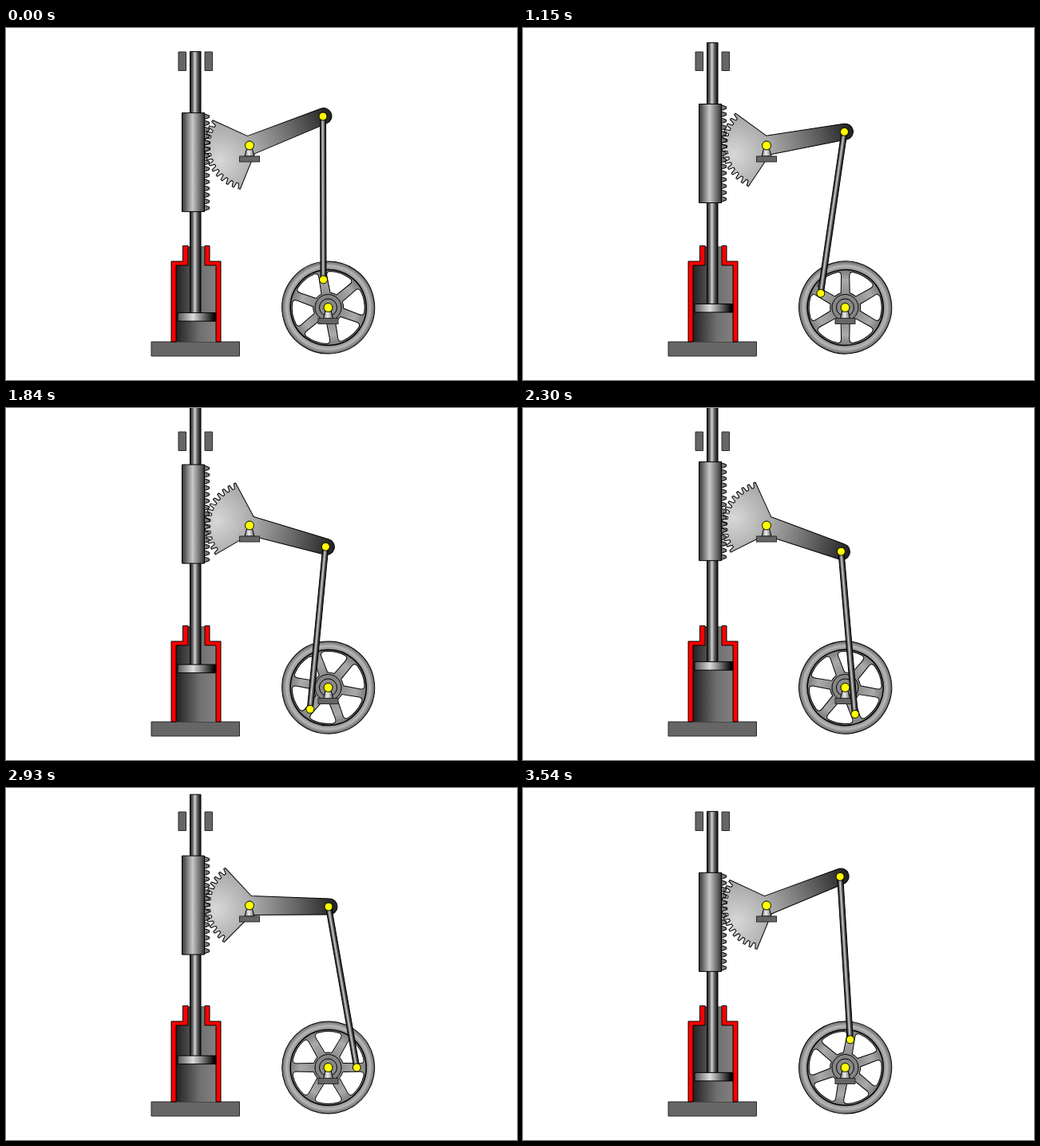
Recreate the animation shown at these times as an HTML page. Size 640 by 442 pixels, loop 3620 ms.

```html
<!DOCTYPE html>
<html lang="en">
<head>
<meta charset="utf-8">
<title>Rack and sector engine</title>
<style>
html, body { margin: 0; height: 100%; overflow: hidden; background: #fff; }
svg { display: block; width: 100%; height: 100%; }
.line { stroke: #000; stroke-linejoin: round; }
.block { fill: #666; stroke: #2a2a2a; }
.pin { fill: #ff0; stroke: #000; }
</style>
</head>
<body>
<svg viewBox="0 0 640 442">
  <defs>
    <linearGradient id="bar">
      <stop offset="0" stop-color="#1c1c1c"/><stop offset=".2" stop-color="#555"/><stop offset=".45" stop-color="#d0d0d0"/>
      <stop offset=".7" stop-color="#5c5c5c"/><stop offset="1" stop-color="#0c0c0c"/>
    </linearGradient>
    <linearGradient id="rackFill">
      <stop offset="0" stop-color="#333"/><stop offset=".47" stop-color="#c8c8c8"/><stop offset="1" stop-color="#333"/>
    </linearGradient>
    <linearGradient id="bore">
      <stop offset="0" stop-color="#222"/><stop offset=".6" stop-color="#707070"/><stop offset="1" stop-color="#808080"/>
    </linearGradient>
    <linearGradient id="disc">
      <stop offset="0" stop-color="#555"/><stop offset=".4" stop-color="#ddd"/><stop offset=".95" stop-color="#050505"/>
    </linearGradient>
    <linearGradient id="stand">
      <stop offset="0" stop-color="#777"/><stop offset=".45" stop-color="#eee"/><stop offset="1" stop-color="#666"/>
    </linearGradient>
    <radialGradient id="leverFill" gradientUnits="userSpaceOnUse" cx="-42" cy="5" r="147">
      <stop offset="0" stop-color="#d8d8d8"/><stop offset=".3" stop-color="#acacac"/>
      <stop offset=".65" stop-color="#6c6c6c"/><stop offset="1" stop-color="#262626"/>
    </radialGradient>
    <radialGradient id="rim" gradientUnits="userSpaceOnUse" cx="0" cy="0" r="58">
      <stop offset=".25" stop-color="#8c8c8c"/><stop offset=".6" stop-color="#aaa"/><stop offset=".8" stop-color="#808080"/>
      <stop offset=".9" stop-color="#b8b8b8"/><stop offset="1" stop-color="#666"/>
    </radialGradient>
    <g id="base">
      <path class="line" fill="url(#stand)" d="M-6 13.5L-3 2H3L6 13.5Z"/>
      <rect class="block" x="-12.5" y="13.5" width="25" height="7"/>
    </g>
  </defs>

  <path class="block" d="M216 30h9.5v23.5h-9.5zM249 30h9.5v23.5h-9.5zM182 394h110.500v18h-110.500z"/>
  <path fill="url(#bore)" d="M213 394V298H228V274H249V298H263V394Z"/>
  <path class="line" fill="red" d="M207 394V293H221.500V273.500H228V298H213V394ZM269 394V293H255V273.500H249V298H263V394Z"/>

  <g id="slide">
    <rect class="line" fill="url(#bar)" x="230.5" y="-139" width="13.5" height="330"/>
    <path id="teeth" class="line" fill="#777"/>
    <rect class="line" fill="url(#rackFill)" x="220.5" y="-62" width="28" height="124"/>
    <rect class="line" fill="url(#disc)" x="215" y="189" width="48" height="10.5"/>
  </g>

  <path id="lever" class="line" fill="url(#leverFill)"/>
  <use href="#base" x="305" y="147.5"/>
  <circle class="pin" cx="305" cy="147.5" r="5.5"/>

  <g id="wheel">
    <circle class="line" r="58" fill="url(#rim)"/>
    <circle class="line" r="47.5" fill="none" stroke-width="1.5"/>
  </g>
  <g transform="translate(403.5 351)">
    <circle class="line" r="16.5" fill="#858585"/>
    <circle class="line" r="11" fill="#8a8a8a"/>
    <use href="#base"/>
  </g>
  <rect id="rod" class="line" fill="url(#bar)" x="-3.5" y="-3" width="7" height="211" rx="3.5"/>
  <circle class="pin" cx="403.5" cy="351" r="5.5"/>
  <circle id="top" class="pin" r="5"/>
  <circle id="crank" class="pin" r="5"/>
</svg>
<script>
const $ = id => document.getElementById(id);
const set = (id, name, value) => $(id).setAttribute(name, value);
const place = (id, x, y, turn = 0) => set(id, "transform", `translate(${x} ${y}) rotate(${turn})`);
const DEG = Math.PI / 180;
const polar = (r, deg) => [r * Math.cos(deg * DEG), r * Math.sin(deg * DEG)].map(v => v.toFixed(2)).join(" ");

const pivot = { x: 305, y: 147.5 }, hub = { x: 403.7, y: 351 };
const ARM = 99, ROD = 205, THROW = 35.6, PITCH = 8.2, PITCH_R = 54.5;

// Times at which the crank advances ten degrees
const ticks = [0, 840, 920, 1000, 1070, 1150, 1300, 1380, 1460, 1530, 1610, 1690,
  1760, 1840, 1920, 2000, 2070, 2150, 2230, 2300, 2380, 2530, 2610, 2700, 2790,
  2860, 2930, 3000, 3080, 3160, 3230, 3310, 3390, 3460, 3540];
const LOOP = 3620;

function build() {
  let rack = "M248 -62";
  for (let k = -7; k <= 7; k++) {
    const y = k * PITCH;
    rack += `L248 ${y - 3.6}L254.5 ${y - 1.3}V${y + 1.3}L248 ${y + 3.6}`;
  }
  set("teeth", "d", rack + "V62Z");

  const step = 8.47, edge = [];
  for (let k = -6.5; k <= 6.5; k++)
    for (const [r, off] of [[49.5, -.33], [56, -.14], [56, .14], [49.5, .33]])
      edge.push(polar(r, 180 - (k + off) * step));
  set("lever", "d", `M2 -12L${edge.slice(1, -1).join("L")}L2 12L100 10A10 10 0 0 0 100 -10Z`);

  // Openings between the six spokes
  let holes = "";
  for (let a = -90; a < 270; a += 60) {
    const b = a + 60;
    holes += `M${polar(19, a + 17)}L${polar(39, a + 7.5)}Q${polar(45.5, a + 6)} ${polar(45.5, a + 13)}`
      + `A45.5 45.5 0 0 1 ${polar(45.5, b - 13)}Q${polar(45.5, b - 6)} ${polar(39, b - 7.5)}`
      + `L${polar(19, b - 17)}A19 19 0 0 0 ${polar(19, a + 17)}Z`;
  }
  $("wheel").insertAdjacentHTML("beforeend", `<path class="line" fill="#fff" d="${holes}"/>`);
}

function draw() {
  const t = performance.now() % LOOP;
  const turn = 10 * ticks.filter(s => s <= t).length;
  const pin = {
    x: hub.x - THROW * Math.sin(turn * DEG),
    y: hub.y - THROW * Math.cos(turn * DEG)
  };
  const dx = pin.x - pivot.x, dy = pin.y - pivot.y, d = Math.hypot(dx, dy);
  const tilt = Math.atan2(dy, dx) - Math.acos((ARM * ARM + d * d - ROD * ROD) / (2 * ARM * d));
  const end = { x: pivot.x + ARM * Math.cos(tilt), y: pivot.y + ARM * Math.sin(tilt) };

  place("slide", 0, 148 - PITCH_R * tilt);
  place("lever", pivot.x, pivot.y, tilt / DEG);
  place("wheel", hub.x, hub.y, -turn);
  place("rod", end.x, end.y, Math.atan2(pin.y - end.y, pin.x - end.x) / DEG - 90);
  place("top", end.x, end.y);
  place("crank", pin.x, pin.y);
  requestAnimationFrame(draw);
}

build();
draw();
</script>
</body>
</html>
```
